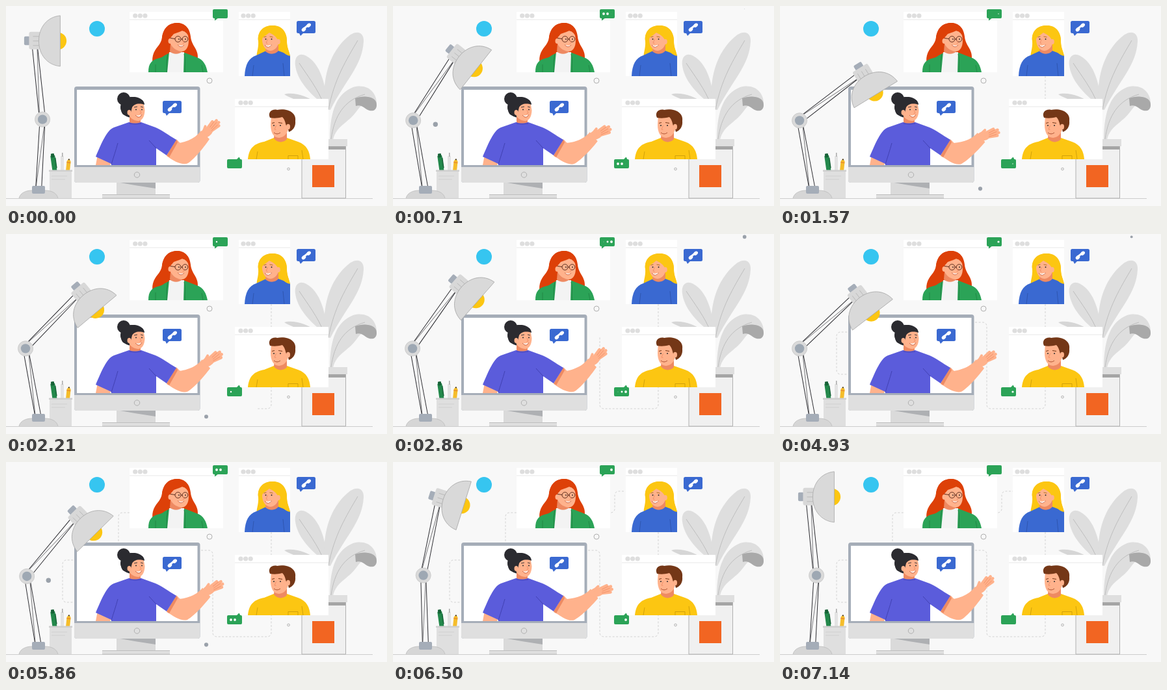
An HTML page with a canvas for the animation above (7.21 s loop, 586 by 308 pixels).

```html
<!DOCTYPE html>
<html lang="en">
<head>
<meta charset="utf-8">
<title>Video call desk</title>
<style>
html, body { margin: 0; width: 100%; height: 100%; overflow: hidden; background: #f8f8f8; }
canvas { display: block; width: 586px; height: 308px; }
</style>
</head>
<body>
<canvas id="stage"></canvas>
<script>
const W = 586, H = 308, LOOP = 7210, STEPS = 101;
const canvas = document.getElementById('stage');
const ratio = window.devicePixelRatio || 1;
canvas.width = W * ratio;
canvas.height = H * ratio;
const c = canvas.getContext('2d');

const STEEL = '#a5adb8', LIGHT = '#dfdfdf', LINE = '#b5b5b5', INK = '#2b2b30';
const SKIN = '#ffb28c', SHADE = '#ee8a62', GREEN = '#2ba357', BLUE = '#3a69d1', YELLOW = '#fcc612';

// ---- drawing helpers ----
function fill(d, color) {
  c.fillStyle = color;
  c.fill(new Path2D(d));
}
function line(d, color, width = 1) {
  c.strokeStyle = color;
  c.lineWidth = width;
  c.stroke(new Path2D(d));
}
function rect(x, y, w, h, color, r = 0) {
  c.fillStyle = color;
  c.beginPath();
  c.roundRect(x, y, w, h, r);
  c.fill();
}
function oval(x, y, rx, ry, color, angle = 0) {
  c.fillStyle = color;
  c.beginPath();
  c.ellipse(x, y, rx, ry, angle, 0, Math.PI * 2);
  c.fill();
}
function dot(x, y, r, color) {
  if (r > 0.05) oval(x, y, r, r, color);
}
function ring(x, y, r, color, width = 1) {
  c.strokeStyle = color;
  c.lineWidth = width;
  c.beginPath();
  c.arc(x, y, r, 0, Math.PI * 2);
  c.stroke();
}
function at(x, y, deg, draw) {
  c.save();
  c.translate(x, y);
  c.rotate(deg * Math.PI / 180);
  draw();
  c.restore();
}

// ---- timing helpers ----
const clamp = v => Math.min(1, Math.max(0, v));
const smooth = p => (1 - Math.cos(Math.PI * p)) / 2;
const steady = p => p;
const ramp = (t, start, length) => smooth(clamp((t - start) / length));

function tween(t, keys, ease = smooth) {
  if (t <= keys[0][0]) return keys[0][1];
  for (let i = 1; i < keys.length; i++) {
    const [t0, v0] = keys[i - 1], [t1, v1] = keys[i];
    if (t < t1) return v0 + (v1 - v0) * ease((t - t0) / (t1 - t0));
  }
  return keys[keys.length - 1][1];
}

const lowerKeys = [[0, 3.2], [740, -10.5], [5560, -10.5], [7150, 3.2]];
const upperKeys = [[0, -6], [740, 34], [1600, 52.5], [2700, 35], [4600, 47], [5500, 45], [7150, -6]];
const waveKeys = [[0, 0], [1150, .95], [2800, 0], [4070, 1], [5450, 0], [6300, 1], [7070, 0]];
const routeKeys = [[1400, 0], [2860, 363], [4070, 679], [5860, 1040], [6500, 1137]];
const route = [[408, 108], [408, 269], [318, 269], [318, 136], [200, 136], [200, 216], [87, 216],
  [87, 151], [173, 151], [173, 78], [341, 78], [341, 45], [358, 45]];

// ---- background ----
function drawRoute(t) {
  let left = tween(t, routeKeys, steady);
  if (left <= 0) return;
  const pts = [route[0]];
  for (let i = 1; i < route.length && left > 0; i++) {
    const [x0, y0] = route[i - 1], [x1, y1] = route[i];
    const len = Math.hypot(x1 - x0, y1 - y0), p = Math.min(1, left / len);
    pts.push([x0 + (x1 - x0) * p, y0 + (y1 - y0) * p]);
    left -= len;
  }
  c.beginPath();
  c.moveTo(...pts[0]);
  for (let i = 1; i < pts.length - 1; i++) {
    const [x, y] = pts[i], [nx, ny] = pts[i + 1];
    c.arcTo(x, y, nx, ny, Math.min(6, Math.hypot(nx - x, ny - y) / 2));
  }
  c.lineTo(...pts[pts.length - 1]);
  c.strokeStyle = '#d2d2d2';
  c.lineWidth = 1;
  c.setLineDash([3, 2.5]);
  c.stroke();
  c.setLineDash([]);
}

function drawPlant() {
  fill('M490 152 C467 136 448 114 445 92 C443 78 451 71 462 77 C482 88 492 118 494 152Z', '#dedede');
  line('M451 88 C464 108 480 128 489 152', LINE, .8);
  fill('M428 136 C440 132 464 138 478 150 L450 150 C446 142 436 142 428 136Z', '#d6d6d6');
  fill('M491 158 C484 104 503 64 530 44 C541 37 551 41 550 55 C548 92 522 114 499 160Z', '#dedede');
  line('M541 53 C524 82 504 114 496 160', LINE, .8);
  fill('M498 206 C498 160 510 134 534 125 C556 119 571 133 570 152 C558 144 548 150 540 161 C526 181 508 184 503 206Z', '#dedede');
  fill('M537 142 C550 137 572 139 570 154 C569 163 560 163 553 158 C548 154 543 152 538 154Z', '#a9a9a9');
  line('M500 205 C505 169 520 145 552 136', LINE, .8);
  rect(455, 214, 67, 82, '#f0f0f0');
  line('M455 214 V296 H522.5 V214', '#b0b0b0');
  rect(455, 215, 67, 6, '#a5a5a5');
  rect(450, 205, 75, 11, LIGHT);
  rect(471, 245, 34, 34, '#f26522');
}

function drawWindow(x, y, w, h, lampX) {
  rect(x, y, w, h, '#fff');
  rect(x, y + 11.5, w, 1, '#e7e7e7');
  for (let i = 0; i < 3; i++) dot(lampX + i * 7.6, y + 6, 3.6, '#dedede');
}

// ---- people in the small windows ----
function drawRedhead() {
  fill('M262 26 C275 25 283 35 284 47 C285 61 296 66 295 80 C294 90 292 97 288 102 H227 C229 93 223 88 226 76 C229 64 238 61 240 49 C242 35 248 27 262 26Z', '#dd4008');
  fill('M219 102 C219 88 224 83 236 80 L252 72 H275 L293 79 C304 82 308 92 310 102Z', GREEN);
  fill('M248 102 L251 71 H274 L273 102Z', '#f3f3f3');
  line('M249 74 C246 84 248 94 247 102 M274 74 C277 84 274 94 276 102', '#1f7d40', .9);
  line('M230 90 V102 M301 91 L303 102', '#1f7d40', .7);
  fill('M253 58 H271 V70 C266 75 257 75 252 70Z', SHADE);
  fill('M253 44 C257 36 275 36 280 43 L281 53 C281 63 277 70 270 70 C261 69 254 63 252 55Z', SKIN);
  fill('M250 62 C250 50 254 48 258 43 C264 41 269 39 271 38 C276 39 280 43 282 50 C285 37 276 26 262 26 C247 27 239 40 240 53 C238 64 230 67 228 80 C240 82 248 76 250 62Z', '#dd4008');
  oval(252.5, 54, 3, 4, SKIN);
  ring(264.5, 51, 4.5, '#5b2b1b', 1);
  ring(275.5, 51, 4.3, '#5b2b1b', 1);
  line('M253 49.5 L260 50.5 M269 51 H271.2', '#5b2b1b');
  dot(266, 51, .9, INK);
  dot(276, 51, .9, INK);
  line('M272.5 53 L274 57 L271.5 57.5', SHADE, .8);
  fill('M264 59.5 Q269 62 274 60 Q270 66 264 59.5Z', '#fff');
  line('M264 59.5 Q269 66 274 60', '#c4512e', .8);
}

function drawBlonde() {
  c.save();
  c.beginPath();
  c.rect(358, 9, 79, 99);
  c.clip();
  fill('M409 30 C424 29 432 40 432 53 C432 64 435 69 437 78 L386 80 C384 74 389 66 388 54 C386 42 394 31 409 30Z', YELLOW);
  fill('M367 108 C368 90 373 80 385 76 L400 69 H419 L438 76 V108Z', BLUE);
  line('M381 91 L379 108 M426 88 L428 108', '#2d51a8', .8);
  fill('M400 60 H419 V69 C414 75 405 75 399 70Z', SHADE);
  fill('M395 46 C398 39 414 37 420 46 C421 59 416 68 407 69 C398 69 394 59 394 52Z', SKIN);
  fill('M394 50 C397 46 402 44 405 41 C411 44 416 47 419 54 C420 66 427 75 437 77 C436 69 431 63 432 52 C431 38 422 30 408 30 C395 31 387 39 388 53 C390 55 393 53 394 50Z', YELLOW);
  oval(419, 55, 2.8, 4, SKIN);
  dot(399.5, 51, 1, INK);
  dot(408.5, 51, 1, INK);
  line('M396.5 48 L400.5 47 M405.5 47 L410.5 48', '#a86a16', .9);
  line('M402.5 51 L400 57 L402.5 57.5', SHADE, .8);
  fill('M398 60 Q403 62 409 59.5 Q404 67 398 60Z', '#fff');
  line('M398 60 Q403 67 409 59.5', '#c4512e', .8);
  c.restore();
}

function drawMan() {
  fill('M372 236 C374 218 382 212 397 209 L412 203 H432 L449 209 C463 214 467 224 468 236Z', YELLOW);
  line('M387 224 L385 236 M455 222 L457 236 M434 236 V230.5 H449 V236', '#c7990a', .8);
  fill('M413 192 H432 V205 C427 211 417 211 412 204Z', SHADE);
  fill('M408 168 H433 L435 184 C434 195 429 202 420 203 C411 203 407 194 407 183Z', SKIN);
  fill('M406 172 C402 164 409 158 417 160 C434 157 447 165 445 177 C446 186 441 192 435 194 C434 187 431 186 430 181 C429 177 428 174 425 171 C418 173 411 173 406 172Z', '#743717');
  oval(434, 186, 3, 4.2, SKIN);
  dot(412, 184, 1, INK);
  dot(422, 184, 1, INK);
  line('M409 180.5 L413 179.5 M419 179.5 L425 180.5', '#743717', 1);
  line('M415.5 184 L413 190 L415.5 190.5', SHADE, .8);
  line('M412 195 Q417 199 422 195', '#a84a2a', .9);
}

// ---- speech bubbles ----
function drawCall(x, y) {
  rect(x, y, 29, 19, BLUE, 2.5);
  fill(`M${x + 3} ${y + 17} L${x + 6} ${y + 23} L${x + 11} ${y + 18}Z`, BLUE);
  at(x + 14.5, y + 9.5, -40, () => {
    oval(-5, .5, 3.6, 2.7, '#fff');
    oval(5, .5, 3.6, 2.7, '#fff');
    rect(-5, -1.8, 10, 3, '#fff', 1.2);
  });
}

function drawTyping(x, y, tail, t) {
  rect(x, y, 23, 14, GREEN, 2);
  fill(tail, GREEN);
  const p = t % 1733;
  for (let i = 0; i < 3; i++) {
    const size = ramp(p, 290 + i * 155, 200) - ramp(p, 900 + i * i * 120, 320);
    dot(x + 6 + i * 6, y + 7, 1.9 * size, '#fff');
  }
}

// ---- monitor and main figure ----
function drawMonitor() {
  rect(170, 271, 60, 20, '#dadada');
  fill('M170 271 H230 V281 L198 276 L170 271Z', '#aeb0b3');
  rect(148, 290, 104, 6, LIGHT);
  line('M148 290.5 H252 M148 296 H252', '#bcbcbc', .9);
  rect(105, 124, 193.5, 148, STEEL, 4);
  rect(109, 129, 185.5, 116, '#fff');
  c.fillStyle = LIGHT;
  c.beginPath();
  c.roundRect(105, 248, 193.5, 24, [0, 0, 4, 4]);
  c.fill();
  ring(201.5, 260, 4.2, '#aaa', .9);
}

function drawHand() {
  const fingers = [[8, -4, 22, -8], [9, -2, 28, -5.5], [9, 0, 29, -1], [8, 2, 26, 3]];
  oval(5, -.5, 11, 7, SKIN);
  c.lineCap = 'round';
  line('M1 -4 L9 -9', SKIN, 4);
  for (const [x0, y0, x1, y1] of fingers) line(`M${x0} ${y0} L${x1} ${y1}`, SKIN, 4.6);
  line('M14 -3.6 L24 -6.4 M14 -.6 L26 -3.2 M13 2 L25 1', SHADE, .7);
  c.lineCap = 'butt';
}

function drawHost(t) {
  const wave = tween(t, waveKeys);
  dot(181, 143, 10, INK);
  oval(194, 156, 18, 16, INK);
  fill('M141 229 L163 238 L160 245 H138Z', SKIN);
  fill('M263 206 L247 231 L264 240 L280 224Z', SKIN);
  at(268, 232, wave * 7, () => {
    fill('M-10 -20 C4 -21 22 -26 32 -40 L45 -27 C34 -11 20 5 12 10 C4 14 -10 7 -18 1Z', SKIN);
    at(37, -34, -38 + wave * 26, drawHand);
  });
  fill('M262 205 L247 230 L251 233 L264 210Z', SHADE);
  fill('M189 179 L166 187 C155 191 147 211 138 232 L162 243 V245 H231 V219 L247 230 L262 206 C250 199 240 191 230 187 L208 179Z', '#5b5cdb');
  line('M172 211 C169 222 165 234 162 244 M220 207 L231 219', '#3f3fae', .9);
  line('M190 181 Q199 183 208 181', '#3f3fae', .8);
  fill('M190 168 H207 V179 C202 181 194 181 190 179Z', SHADE);
  fill('M191 152 C198 147 209 148 212 152 L213.5 161 C213 171 209 177 203 177 C195 176 189 172 188 163Z', SKIN);
  fill('M177 160 C174 145 187 139 198 140 C207 141 213 146 213 152 C204 149 197 151 194 156 L192 164 L188 168 C182 170 178 167 177 160Z', INK);
  oval(189.5, 164, 3, 4, SKIN);
  dot(200, 159.5, 1, INK);
  dot(209, 159.5, 1, INK);
  line('M197 156 L202 155 M207 155 L211 156', INK, .9);
  line('M206 160 L208 165 L205.5 165.5', SHADE, .8);
  fill('M199 168 Q204 170 209 167 Q205 174 199 168Z', '#fff');
  line('M199 168 Q205 175 209 167', '#c4512e', .8);
}

// ---- desk objects ----
function drawPens() {
  at(75, 254, -8, () => {
    rect(-3.5, -24, 7, 24, '#23884b', 1);
    rect(-2.5, -27, 5, 6, '#176237', 1);
    line('M3.5 -20 V-4', '#176237', 1.5);
  });
  rect(84, 231, 5, 23, '#e3e3e3', 1);
  rect(86, 226, 1.5, 6, '#a8a8a8');
  at(95, 254, 6, () => {
    fill('M-3 0 V-15 L0 -19 L3 -15 V0Z', '#f5bd2b');
    fill('M-1.5 -17 L0 -19 L1.5 -17Z', INK);
    line('M-3 -13 H3', '#e98b2d', 1.5);
  });
  rect(67, 254, 34, 42, LIGHT);
  rect(66, 252.5, 36, 2.5, '#cfcfcf');
  line('M70 262 H94 M70 267 H91', '#cacaca', .7);
}

function drawLamp(t) {
  const rad = Math.PI / 180;
  const low = tween(t, lowerKeys), up = tween(t, upperKeys);
  const ex = 50 + 109.5 * Math.sin(low * rad), ey = 284 - 109.5 * Math.cos(low * rad);
  const hx = ex + 121.5 * Math.sin(up * rad), hy = ey - 121.5 * Math.cos(up * rad);
  const rods = reach => {
    line(`M-4.5 -4 L-4 ${-reach} M4.5 -4 L4 ${-reach}`, INK, 1);
    line(`M-4 -6 L3.5 ${-reach}`, INK, .6);
  };

  fill('M20 296 C22 287 32 284 40 284 H60 C70 284 78 288 80 296Z', '#d6d6d6');
  line('M20 296 C22 287 32 284 40 284 H60 C70 284 78 288 80 296', '#bcbcbc', .8);
  at(50, 284, low, () => rods(103));
  rect(40, 277, 20, 12, STEEL, 2);
  at(ex, ey, up, () => rods(112));
  dot(ex, ey, 11.8, '#dadada');
  ring(ex, ey, 11.5, '#c8c8c8', .7);
  dot(ex, ey, 7.2, '#9ea8b3');

  at(hx, hy, up + 6, () => {
    rect(-15.5, -7, 9, 13.5, STEEL, 2);
    rect(-8, -14, 18, 27, '#d8d8d8', 3);
    line('M-2 -7 H9 M-2 0 H9 M-2 7 H9', LINE, .8);
    dot(36.5, 0, 13.2, YELLOW);
    const dome = 'M40 -39 C19 -37 7 -20 7 0 C7 20 19 37 40 39Z';
    fill(dome, '#d9d9d9');
    line(dome, '#a9a9a9', .8);
  });
}

// Only pops that can finish before the loop ends are shown.
function drawPop(t, x, y, r, start, period, length) {
  const p = (t - start) % period;
  if (p < 0 || p > length || t - p + length > LOOP) return;
  dot(x, y, r * ramp(p, -20, 180) * (1 - ramp(p, length - 180, 180)), '#9aa1aa');
}

function draw(t) {
  c.setTransform(ratio, 0, 0, ratio, 0, 0);
  rect(0, 0, W, H, '#f8f8f8');
  rect(0, 296, 564, 1, '#cdcdcd');
  drawRoute(t);
  drawPlant();
  dot(140, 35, 12, '#36c5f0');

  drawWindow(190, 9, 144, 93, 198.7);
  drawRedhead();
  drawWindow(358, 9, 79, 99, 365);
  drawBlonde();
  drawWindow(352, 143, 144, 93, 361);
  drawMan();

  drawTyping(318, 5, 'M321 18 V22.5 L327 18Z', t);
  drawTyping(340, 236, 'M354 237 L358.5 232.5 L361 237Z', t);
  drawCall(447, 23);
  drawMonitor();
  drawHost(t);
  drawCall(241, 146);
  drawPens();

  ring(313, 115, 4, '#a8a8a8', .9);
  ring(434.5, 251, 1.8, '#a8a8a8', .9);
  drawPop(t, 65.3, 182.2, 3.7, 400, 2575, 800);
  drawPop(t, 540.7, 4.4, 3.1, 620, 2110, 820);
  drawPop(t, 308, 281.3, 3.1, 1400, 2110, 900);
  drawLamp(t);
}

const begin = performance.now();
function tick() {
  const step = Math.floor(((performance.now() - begin) % LOOP) / LOOP * STEPS);
  draw(step * LOOP / STEPS);
  requestAnimationFrame(tick);
}
tick();
</script>
</body>
</html>
```
